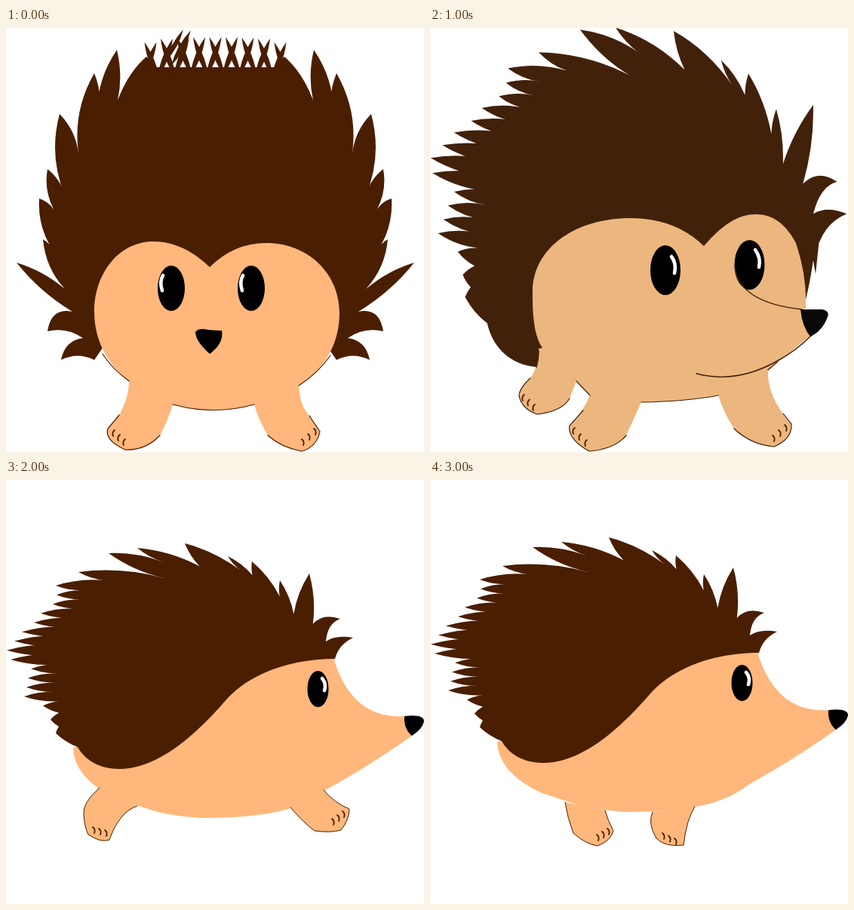
An HTML page that plays this animation: 554 px wide and 562 px high, repeating every 3.5 s.

```html
<!DOCTYPE html>
<html>
<head>
<meta charset="utf-8">
<style>
html, body { margin: 0; width: 100%; height: 100%; overflow: hidden; background: #fff; }
svg { display: block; width: 554px; height: 562px; }
</style>
</head>
<body>
<svg id="stage" viewBox="0 0 554 562"></svg>
<script>
const BROWN = '#4a1e00', SKIN = '#ffb77b';
const stage = document.getElementById('stage');

const fill = (d, color) => `<path d="${d}" fill="${color}"/>`;
const line = (d, color = BROWN, width = 1.2) =>
  `<path d="${d}" fill="none" stroke="${color}" stroke-width="${width}" stroke-linecap="round"/>`;
const place = (matrix, content) => `<g transform="matrix(${matrix})">${content}</g>`;
const mirror = content => place('-1 0 0 1 555 0', content);

// Joins points with edges that bulge to the left of their direction.
function spikes(points, bulge) {
  return points.slice(1).map(([x, y], i) => {
    const [px, py] = points[i];
    return `Q${(px + x) / 2 + (y - py) * bulge} ${(py + y) / 2 - (x - px) * bulge} ${x} ${y}`;
  }).join('');
}

const leaf = (x, y, tipX, tipY) =>
  `M${x} ${y}` + spikes([[x, y], [tipX, tipY], [x, y]], 0.13);

const eye = (x, y, rx, ry, shine) =>
  `<ellipse cx="${x}" cy="${y}" rx="${rx}" ry="${ry}"/>` + line(shine, '#fff', 4.6);

const toes = (x, y, dx, dy, lean = 1) => [0, 1, 2].map(i =>
  line(`M${x + i * dx - 2 * lean} ${y + i * dy - 4}q${4 * lean} 3 ${2 * lean} 8`, BROWN, 1.8)).join('');

function frontFur() {
  const half = 'M278 440L128 424L117 440Q95 429 73 440Q78 414 102 411Q80 396 55 402Q60 370 88 376Q45 350 14 311Q50 322 78 346' +
    spikes([[78, 346], [49, 280], [63, 296], [44, 226], [63, 240], [55, 187], [78, 222],
      [71, 114], [96, 166], [117, 60], [121, 122], [147, 29], [138, 126]], 0.17) +
    'L149 93Q163 58 186 38L200 52L278 52Z';
  // The crown is a row of crossed blades.
  let crown = leaf(219, 50, 245, 3) + leaf(212, 44, 235, 2);
  for (let i = 0; i < 9; i++) {
    const x = 191.5 + i * 21.5, drop = 8 * ((x - 277.5) / 90) ** 4;
    for (const side of [-1, 1]) crown += leaf(x - side * 12, 64 + drop, x + side * 8, 12 + drop);
  }
  return fill(half, BROWN) + mirror(fill(half, BROWN)) + fill(crown, BROWN);
}

function front() {
  const skin = 'M270 317Q235 283 195 283C150 283 117 325 117 376C117 420 140 450 163 468Q163 490 150 513' +
    'L135 531Q130 546 158 559Q185 560 204 540Q215 520 221 499Q275 514 329 499Q335 520 347 540Q365 556 392 561' +
    'Q412 555 416 535L402 514Q389 500 388 474C420 455 442 420 442 378C442 325 400 285 345 285Q302 285 270 317Z';
  return frontFur() + fill(skin, SKIN) +
    line('M128 432Q141 452 163 468M388 474Q414 457 430 434M221 499Q275 514 329 499' +
      'M150 513L135 531Q130 546 158 559Q185 560 204 540M347 540Q365 556 392 561Q412 555 416 535L402 514') +
    toes(142, 537, 7, 6, -1) + toes(394, 549, 8, -7) +
    eye(219, 345, 18, 30, 'M208 328Q203 336 207 348') + eye(325, 345, 18, 30, 'M314 328Q309 336 313 348') +
    fill('M251 403Q255 397 268 400Q280 401 286 401Q289 418 270 432Q251 415 251 403Z', '#000');
}

function sideFur(color) {
  // Rear fan: evenly stacked quills, whose roots follow the slope of the back.
  const reach = [66, 67, 62, 46, 37, 21, 11, 1, 6, 33, 29, 27, 24, 49, 59, 66];
  const tips = reach.map((x, i) => [x, 135 + 12.25 * i + 6 * Math.max(0, i - 13)]);
  const points = [[95, 349]];
  for (let i = tips.length - 1; i >= 0; i--) {
    points.push(tips[i]);
    if (!i) break;
    const y = (tips[i][1] + tips[i - 1][1]) / 2;
    points.push([70 + 0.3 * Math.max(0, 250 - y), y]);
  }
  points.push([130, 128]);
  // Crest: tip and length of each quill, turning steadily upright towards the head.
  [[96, 117, 113], [136, 92, 73], [174, 85, 86], [237, 79, 82], [294, 96, 41], [326, 103, 59], [363, 128, 48], [402, 119, 67]]
    .forEach(([x, y, length], i) => {
      const angle = (4 + 4 * i + 1.1 * i * i) * Math.PI / 180;
      points.push([x, y], [x + length * Math.cos(angle), y + length * Math.sin(angle)]);
    });
  return fill('M95 349' + spikes(points, 0.1) +
    'Q420 171 443 179Q426 185 424 209Q437 200 460 204Q441 213 436 232' +
    'C380 232 325 250 293 285C250 335 200 378 150 378C125 378 105 367 95 349Z', color);
}

function turned() {
  const brown = '#42210b';
  const skin = 'M363 289Q325 252 265 252C195 252 136 290 136 350Q135 405 149 424L144 425Q146 445 133 464' +
    'Q118 478 118 488Q122 505 142 512Q175 508 185 491L194 468L212 487Q203 508 185 527Q182 545 211 561Q245 558 260 540' +
    'L280 496Q340 495 382 487Q390 512 403 531Q425 552 456 555Q480 545 479 525Q447 490 448 455L460 444L504 408L491 373' +
    'L498 372Q500 330 485 285Q465 247 433 247Q400 245 363 289Z';
  return place('1.191 .218 -.289 1.549 63.5 -170', sideFur(brown)) +
    fill('M516 280L511 326L508 308Q503 340 498 360L400 300L480 240Z', brown) +
    fill(skin, '#ecb77e') +
    line('M141 450Q144 440 144 428M133 464Q118 478 118 488Q122 505 142 512Q175 508 185 491M194 468L212 487' +
      'M203 507L185 527Q182 545 211 561Q245 558 260 540M280 496Q340 495 382 487' +
      'M403 531Q425 552 456 555Q480 545 479 525L468 511M448 453L460 443', brown) +
    eye(312, 321, 20, 33, 'M320 303Q327 312 324 325') + eye(423.5, 314, 20, 33, 'M431 294Q439 305 436 317') +
    line('M404 317Q410 364 493 373M353 458Q405 472 459 442Q485 428 505 408', brown, 1.5) +
    toes(123, 490, 7, 6.5, -1) + toes(190, 534, 8, 8, -1) + toes(456, 544, 8, -7) +
    fill('M491 373L520 373Q530 375 527 383Q520 402 504 409Q493 395 491 373Z', '#080808');
}

function sideBody() {
  const skin = 'M434 231Q458 312 527 308L538 334Q480 375 425 405Q405 420 386 427Q345 443 260 443Q222 441 194 433' +
    'L146 417Q90 390 89 350L150 330L300 200L420 210Z';
  return fill(skin, SKIN) + sideFur(BROWN) +
    eye(413.5, 272, 14, 24, 'M419 258Q425 265 422 274') +
    fill('M528 308Q554 305 554 315Q552 325 538 334Q527 325 528 308Z', '#000');
}

const leg = (d, marks) => fill(d, SKIN) + line(d, BROWN, 1) + marks;

const hind = leg('M147 416Q144 440 147 460Q158 475 170 482Q190 484 197 472Q193 455 194 433', toes(174, 472, 8, -1));
const fore = leg('M337 438Q345 457 354 469Q370 478 386 479Q402 472 405 460Q392 448 385 426', toes(379, 468, 8.5, -2.5));
const stretched =
  leg('M124 408Q101 428 103 443Q104 460 109 470Q125 481 137 477Q150 440 174 432', toes(117, 464, 8, 2)) +
  leg('M377 434Q395 455 409 465Q430 468 444 464Q455 450 455 436Q435 428 421 411', toes(434, 453, 7, -5));
const gathered =
  leg('M179 427Q182 448 190 468Q205 482 222 485Q240 478 243 465Q236 452 232 438', toes(223, 474, 7, -4)) +
  leg('M295 440Q288 455 300 475Q312 487 336 484Q340 450 351 433', toes(310, 472, 8, 3.5));

// The body bobs with each step; the legs keep to the ground.
const side = (bob, legs) => place(`1 0 0 1 0 ${bob}`, sideBody()) + legs;

const poses = [
  front(),
  mirror(front()),
  turned(),
  side(0, hind + fore),
  side(5, stretched),
  side(0, place('1 0 0 1 12 0', hind) + fore),
  side(-3, gathered)
];

let shown = -1;
function draw() {
  const pose = Math.floor(performance.now() / 500) % poses.length;
  if (pose !== shown) stage.innerHTML = poses[shown = pose];
  requestAnimationFrame(draw);
}
draw();
</script>
</body>
</html>
```
